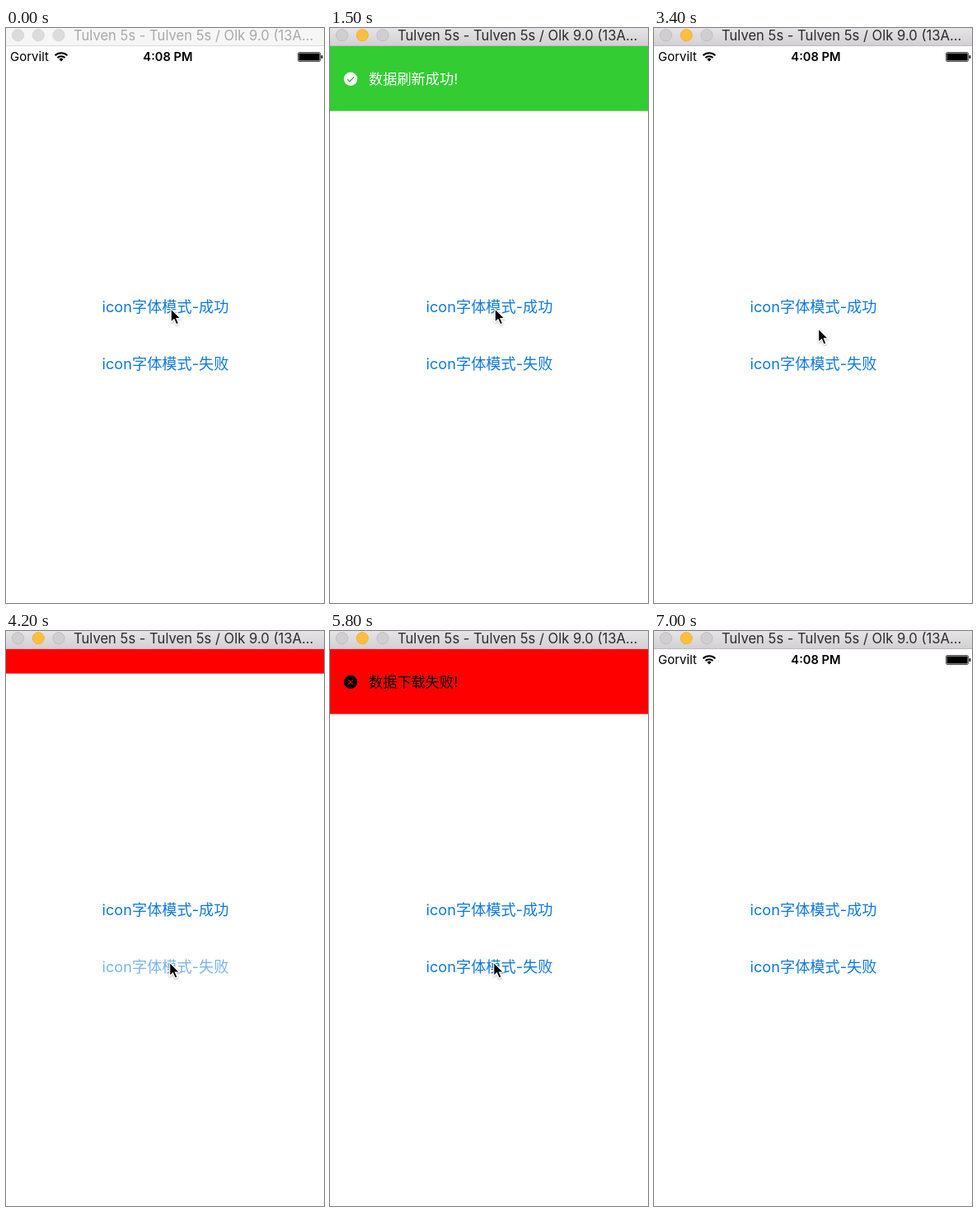
Recreate the animation shown at these times as an HTML page. Size 386 by 696 pixels, loop 8.4 s.

```html
<!DOCTYPE html>
<html lang="zh-CN">
<head>
<meta charset="utf-8">
<title>Notification banner</title>
<style>
  html, body { margin: 0; width: 100%; height: 100%; overflow: hidden; background: #fff; }
  svg { display: block; width: 386px; height: 696px; }
  text { font-family: Inter, "Noto Sans CJK SC", "Noto Sans CJK", sans-serif; white-space: pre; }
  .button { font-size: 18.2px; fill: #0f79de; }
  .message { font-size: 17.2px; }
</style>
</head>
<body>
<svg viewBox="0 0 386 696">
  <defs>
    <linearGradient id="barFill" x2="0" y2="1">
      <stop stop-color="#e6e4e6"/>
      <stop offset="1" stop-color="#d1cfd1"/>
    </linearGradient>
    <filter id="shadow" x="-50%" y="-50%" width="200%" height="200%">
      <feDropShadow dx="0" dy="1" stdDeviation="1" flood-opacity=".35"/>
    </filter>
  </defs>
  <rect width="386" height="696" fill="#fff"/>

  <g id="status">
    <text x="5" y="40" font-size="15">Gorvilt</text>
    <g fill="none" stroke="#000" stroke-width="2">
      <path d="M59.6 33.2a10.6 10.6 0 0 1 14.8 0"/>
      <path d="M62.4 36a6.6 6.6 0 0 1 9.2 0"/>
    </g>
    <path d="M67 40.4l-2.6-2.7a3.7 3.7 0 0 1 5.2 0z"/>
    <text x="196.5" y="40" font-size="14.7" font-weight="600" text-anchor="middle">4:08 PM</text>
    <rect x="354.5" y="29.5" width="27" height="11" rx="1.5" fill="#fff" stroke="#555" stroke-width="1"/>
    <rect x="355.4" y="30.4" width="25.2" height="9.2" rx=".8"/>
    <rect x="382.5" y="33" width="1.8" height="4" rx=".8"/>
  </g>

  <text id="okButton" class="button" x="116.5" y="344">icon字体模式-成功</text>
  <text id="failButton" class="button" x="116.5" y="413">icon字体模式-失败</text>

  <g id="okBanner">
    <rect y="22" width="386" height="78.5" fill="#33cc33"/>
    <circle cx="25" cy="61.8" r="8.2" fill="#fff"/>
    <path d="M21 62l2.8 2.8 5.4-5.5" fill="none" stroke="#33b833" stroke-width="1.3"/>
    <text class="message" x="47" y="67.7" fill="#fff">数据刷新成功!</text>
  </g>
  <g id="failBanner">
    <rect y="22" width="386" height="78.5" fill="#f00"/>
    <circle cx="25" cy="61.8" r="8.2"/>
    <path d="M22 58.8l6 6m0-6l-6 6" stroke="#e00000" stroke-width="1.2"/>
    <text class="message" x="47" y="67.7">数据下载失败!</text>
  </g>

  <rect id="bar" width="386" height="22"/>
  <rect id="barLine" y="21" width="386" height="1"/>
  <g id="lights">
    <circle cx="14.5" cy="8.7" r="7.1"/>
    <circle cx="39.3" cy="8.7" r="7.1"/>
    <circle cx="64" cy="8.7" r="7.1"/>
  </g>
  <text id="title" x="82" y="15" font-size="16.6">Tulven 5s - Tulven 5s / Olk 9.0 (13A...</text>

  <path id="cursor" d="M0 0V16.4L3.8 12.9 6.5 19 9.4 17.8 6.8 11.8H11.8Z"
        stroke="#fff" stroke-width="1.2" filter="url(#shadow)"/>
</svg>
<script>
const LOOP = 8400, STEP = 100, SLIDE = 300, FADE = 280, HEIGHT = 78.5;
const FOCUS = 600, OK_SHOW = 624, FAIL_SHOW = 4075, STAY = 2302;
const el = id => document.getElementById(id);
const set = (node, attrs) => {
  for (const key in attrs) node.setAttribute(key, attrs[key]);
};
const progress = (t, start, length) => Math.min(1, Math.max(0, (t - start) / length));
const ease = p => p * p * (3 - 2 * p);

function slideBanner(node, t, start) {
  const shown = ease(progress(t, start, SLIDE)) - ease(progress(t, start + STAY, SLIDE));
  set(node, {
    transform: `translate(0 ${(shown - 1) * HEIGHT})`,
    visibility: shown > 0 ? "visible" : "hidden"
  });
}

// A press dims the button at once; release fades it back.
function fadeButton(node, t, release) {
  const pressed = t >= release - 50;
  set(node, { opacity: pressed ? 0.2 + 0.8 * progress(t, release, FADE) : 1 });
}

function drawWindow(active) {
  set(el("bar"), { fill: active ? "url(#barFill)" : "#f6f6f6" });
  set(el("barLine"), { fill: active ? "#bdbbbd" : "#dadada" });
  set(el("title"), { fill: active ? "#2c2c2c" : "#a9a9a9" });
  [...el("lights").children].forEach((light, i) => {
    const amber = active && i === 1;
    set(light, {
      fill: amber ? "#fdbe40" : active ? "#d0ced0" : "#dcdcdc",
      stroke: amber ? "#f0b23e" : active ? "#c0bec0" : "#d6d6d6"
    });
  });
}

function drawCursor(t) {
  const down = ease(progress(t, 3250, 350));
  const leave = progress(t, 6700, 300);
  set(el("cursor"), {
    transform: `translate(${200.2 - 1.5 * down + 190 * leave * leave} ${339.8 + 61.4 * down})`,
    visibility: leave < 1 ? "visible" : "hidden"
  });
}

function draw(now) {
  const t = Math.floor(now % LOOP / STEP) * STEP;
  drawWindow(t >= FOCUS);
  slideBanner(el("okBanner"), t, OK_SHOW);
  slideBanner(el("failBanner"), t, FAIL_SHOW);
  fadeButton(el("okButton"), t, OK_SHOW);
  fadeButton(el("failButton"), t, FAIL_SHOW);
  drawCursor(t);
}

const begin = performance.now();
function tick() {
  draw(performance.now() - begin);
  requestAnimationFrame(tick);
}
tick();
</script>
</body>
</html>
```
